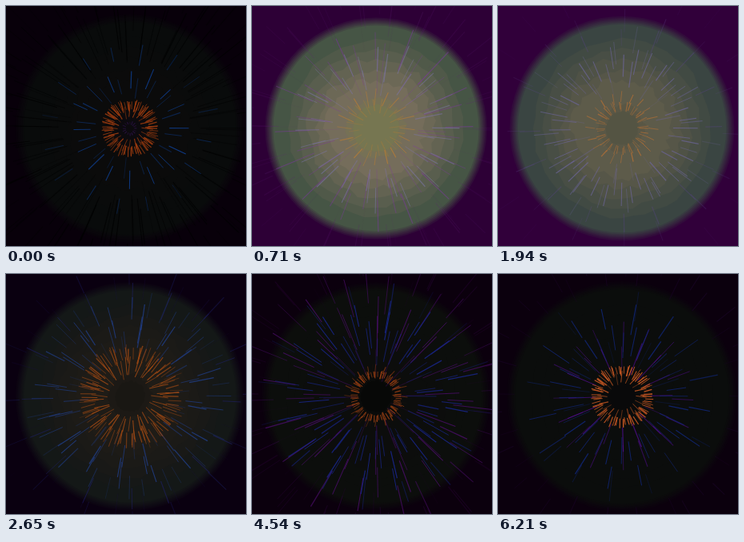
Animation, 300 px wide and 300 px high, one loop 6.32 s. Source, as an HTML page with a canvas:

```html
<!DOCTYPE html>
<html lang="en">
<head>
<meta charset="utf-8">
<title>Starburst</title>
<style>
html, body { margin: 0; width: 100%; height: 100%; overflow: hidden; background: #080009; }
canvas { display: block; width: 300px; height: 300px; }
</style>
</head>
<body>
<canvas id="stage" width="300" height="300"></canvas>
<script>
const ctx = document.getElementById('stage').getContext('2d');
const LOOP = 6320, STEP = 90, CX = 155, CY = 153, TAU = Math.PI * 2;

function random(seed) {
  return () => {
    seed = (seed * 1664525 + 1013904223) >>> 0;
    return seed / 4294967296;
  };
}

const mix = (a, b, p) => a + (b - a) * p;
const blend = (a, b, p) => a.map((v, i) => mix(v, b[i], p));
const rgb = (c, a = 1) => `rgba(${c.map(Math.round).join(',')},${a})`;

// Rows start with their time; the last one runs back into the first.
function sample(rows, t) {
  let i = rows.length - 1;
  while (i && rows[i][0] > t) i--;
  const a = rows[i], b = rows[i + 1] || rows[0];
  const end = rows[i + 1] ? b[0] : LOOP;
  return blend(a, b, (t - a[0]) / (end - a[0])).slice(1);
}

// time, background, outer disc, inner disc, core, disc radius, core radius
const glow = [
  [0, 8, 0, 10, 9, 11, 11, 11, 11, 11, 12, 10, 14, 143, 16],
  [710, 50, 0, 60, 78, 94, 76, 131, 121, 101, 131, 132, 89, 138, 31],
  [1500, 70, 0, 80, 78, 94, 89, 127, 125, 101, 116, 117, 93, 139, 22],
  [2650, 8, 0, 14, 18, 21, 21, 28, 24, 20, 22, 20, 16, 143, 19],
  [3730, 10, 0, 12, 11, 12, 12, 13, 12, 12, 9, 9, 9, 144, 18],
  [4540, 11, 0, 13, 12, 14, 12, 12, 13, 12, 7, 8, 7, 143, 20],
  [6210, 11, 0, 13, 11, 13, 12, 11, 13, 12, 9, 9, 10, 144, 17]
];

// time, inner radius, outer radius, length, alpha, lines per spoke, colour
const orange = [
  [0, 17, 33, 13, .85, 5, 165, 62, 16],
  [710, 26, 44, 18, .6, 1.2, 200, 135, 50],
  [1500, 24, 34, 7, .7, 1, 200, 135, 70],
  [2650, 24, 62, 20, .85, 7, 155, 70, 18],
  [3730, 22, 46, 8, .8, 7, 165, 62, 25],
  [4540, 24, 36, 9, .85, 5, 155, 64, 20],
  [6210, 20, 40, 12, .9, 5, 205, 90, 35]
];
const blue = [
  [0, 48, 106, 22, .85, 2.6, 15, 65, 150],
  [710, 50, 110, 32, .5, 3, 140, 125, 175],
  [1500, 50, 112, 28, .6, 4, 150, 125, 170],
  [2650, 60, 118, 28, .85, 6, 28, 58, 130],
  [3730, 55, 130, 34, .85, 6, 28, 34, 138],
  [4540, 50, 132, 34, .85, 6, 25, 38, 140],
  [5080, 55, 105, 34, .8, 5, 20, 38, 130],
  [6210, 55, 115, 32, .8, 4, 18, 40, 128]
];
const violet = [
  [0, 5, 14, 4, .6, 1, 55, 20, 90],
  [710, 70, 145, 50, .5, 3, 135, 60, 170],
  [1500, 90, 130, 25, .2, 2, 130, 90, 160],
  [2650, 110, 160, 30, .55, 2, 30, 32, 112],
  [3730, 70, 168, 50, .8, 5, 82, 12, 125],
  [4540, 35, 160, 42, .75, 5, 78, 14, 110],
  [5080, 40, 98, 30, .7, 3, 80, 14, 120],
  [5690, 40, 98, 30, .7, 2, 80, 14, 130],
  [6210, 42, 95, 35, .85, 1.6, 85, 14, 150]
];
const haze = [
  [0, 100, 200, 60, .75, 8, 0, 2, 2],
  [710, 120, 180, 40, .1, 3, 110, 30, 140],
  [1500, 130, 180, 30, .06, 1, 110, 30, 140],
  [2650, 130, 190, 30, .4, 1, 25, 15, 70],
  [3730, 130, 190, 40, .4, 2, 45, 5, 65],
  [4540, 130, 190, 40, .4, 3, 45, 5, 60],
  [5080, 140, 190, 20, .3, 1, 30, 5, 45],
  [6210, 140, 185, 25, .5, 2, 30, 5, 45]
];

function makeLayer(rows, seed, spokes, turns, spread, tilt, still) {
  const rnd = random(seed), lines = [];
  for (let j = 0; j < 8; j++) {
    const offset = j ? rnd() - .5 : 0, phase = rnd(), lean = (rnd() - .5) * tilt;
    for (let g = 0; g < spokes; g++) {
      lines.push({
        rank: j,
        angle: (g + offset * spread + (rnd() - .5) * .2) / spokes * TAU,
        phase: phase + (rnd() - .5) * .16,
        lean,
        size: .75 + rnd() * .5,
        width: .7 + rnd() * .6
      });
    }
  }
  return { rows, lines, turns, still };
}

const layers = [
  makeLayer(haze, 17, 22, 2, 1, 0, true),
  makeLayer(violet, 43, 16, 4, 1, .02),
  makeLayer(blue, 71, 16, 4, .85, .06),
  makeLayer(orange, 29, 20, 5, .75, .3)
];

function drawLayer(layer, t) {
  const [inner, outer, length, alpha, count, ...color] = sample(layer.rows, t);
  const still = layer.still && t >= 5080 && t < 5780;
  const turn = (still ? 5080 : t) / LOOP * layer.turns;
  ctx.strokeStyle = rgb(color);
  for (const l of layer.lines) {
    const shown = Math.min(1, count - l.rank);
    if (shown <= 0) continue;
    const p = (l.phase + turn + 1) % 1;
    const r = mix(inner, outer, p), half = length * l.size / 2;
    const x = CX + Math.cos(l.angle) * r, y = CY + Math.sin(l.angle) * r;
    const dx = Math.cos(l.angle + l.lean) * half, dy = Math.sin(l.angle + l.lean) * half;
    ctx.globalAlpha = alpha * shown * Math.min(1, .25 + Math.sin(p * Math.PI));
    ctx.lineWidth = l.width;
    ctx.beginPath();
    ctx.moveTo(x - dx, y - dy);
    ctx.lineTo(x + dx, y + dy);
    ctx.stroke();
  }
  ctx.globalAlpha = 1;
}

function disc(radius, color, rough = 0, seed = 1) {
  ctx.fillStyle = rgb(color);
  ctx.beginPath();
  if (rough) {
    const rnd = random(seed);
    for (let i = 0; i < 48; i++) {
      const a = i / 48 * TAU, r = radius + (rnd() - .5) * rough;
      ctx.lineTo(CX + Math.cos(a) * r, CY + Math.sin(a) * r);
    }
  } else {
    ctx.arc(CX, CY, radius, 0, TAU);
  }
  ctx.fill();
}

function drawGlow(t) {
  const v = sample(glow, t);
  const back = v.slice(0, 3), rim = v.slice(3, 6), mid = v.slice(6, 9), core = v.slice(9, 12);
  const [radius, heart] = v.slice(12);
  ctx.fillStyle = rgb(back);
  ctx.fillRect(0, 0, 300, 300);
  for (let i = 1; i <= 6; i++) disc(radius - (i - 1) * 2, blend(back, rim, i / 6));
  for (let i = 1; i <= 5; i++) {
    disc(radius * (.88 - i * .088), blend(rim, mid, i / 5), 3 + i * 1.6, 80 + i);
  }
  disc(heart + 8, blend(mid, core, .5), 5, 91);
  disc(heart, core, 3, 97);
}

function draw(ms) {
  const t = Math.min(69, Math.floor(ms % LOOP / STEP)) * STEP;
  drawGlow(t);
  layers.forEach(layer => drawLayer(layer, t));
}

let start;
function tick(now) {
  if (start === undefined) start = now;
  draw(now - start);
  requestAnimationFrame(tick);
}
draw(0);
requestAnimationFrame(tick);
</script>
</body>
</html>
```
